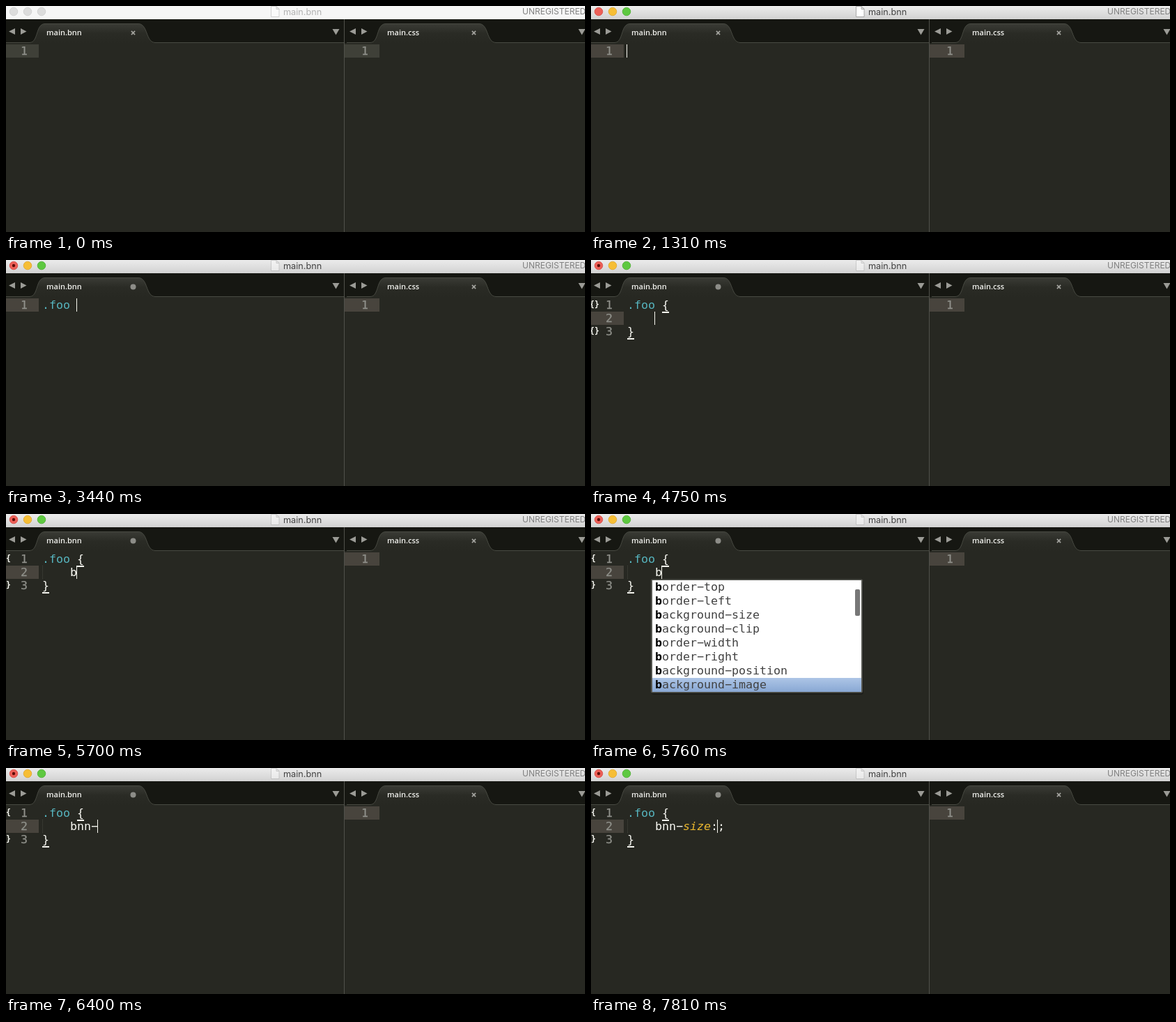
These frames come from a looping animation (831x324 px, 8000 ms). An HTML page:

```html
<!DOCTYPE html>
<html lang="en">
<head>
<meta charset="utf-8">
<title>Editor typing</title>
<style>
  html, body { margin: 0; width: 100%; height: 100%; overflow: hidden; background: #272822; }
  svg { display: block; width: 831px; height: 324px; }
  .code text { font: 16.61px "DejaVu Sans Mono", monospace; white-space: pre; fill: #f8f8f2; stroke-width: .25px; }
  .code .num { fill: #90918b; stroke: #90918b; }
  .code .sel { fill: #56b4be; }
  .code .prop { fill: #e9b62f; font-style: italic; }
  .code .mark { font-size: 11.5px; font-weight: bold; }
  .code .item { fill: #424242; }
  .code .hit { fill: #000; font-weight: bold; }
  .tab { font: 600 11px "Open Sans", "Noto Sans", sans-serif; fill: #f2f2ee; }
  .title { font: 12.7px Inter, sans-serif; fill: #b3b3b3; }
  .note { font: 12px Inter, sans-serif; fill: #808080; }
  .bar { fill: #f6f6f6; }
  .light { fill: #dcdcdc; stroke: #cecece; stroke-width: .8; }
  .row { fill: #3f4038; }
  .icon { opacity: .5; }
  .dot { visibility: hidden; }
  .focus .title { fill: #444; }
  .focus .bar { fill: url(#bar); }
  .focus .row { fill: #48443d; }
  .focus .icon { opacity: 1; }
  .focus .red { fill: #ec5f57; stroke: #d64a43; }
  .focus .amber { fill: #f6be35; stroke: #dea52b; }
  .focus .green { fill: #5ec840; stroke: #4bae30; }
  .dirty .icon { opacity: .45; }
  .dirty .dot { visibility: visible; }
  .dirty .clean { visibility: hidden; }
</style>
</head>
<body>
<svg id="stage" viewBox="0 0 831 324">
  <defs>
    <linearGradient id="bar" x2="0" y2="1">
      <stop stop-color="#ebebeb"/><stop offset="1" stop-color="#d2d2d2"/>
    </linearGradient>
    <linearGradient id="tab" x2="0" y2="1">
      <stop stop-color="#3a3b35"/><stop offset=".5" stop-color="#2a2b25"/><stop offset="1" stop-color="#272822"/>
    </linearGradient>
    <linearGradient id="pick" x2="0" y2="1">
      <stop stop-color="#adc5e6"/><stop offset="1" stop-color="#89a8d4"/>
    </linearGradient>
    <g id="pane">
      <path d="M13 32v9l-9-4.500z M21 32v9l8.500-4.500z" fill="#9b9b96"/>
      <path d="M34 53C47 52 42 25.500 56 25.500H190C204 25.500 200 52 214 53z" fill="url(#tab)"/>
      <path d="M0 52.500H34C47 52 42 25.500 56 25.500H190C204 25.500 200 52 214 52.500H485" fill="none" stroke="#484a42"/>
    </g>
    <path id="cross" d="M-2.600 -2.600L2.600 2.600M2.600 -2.600L-2.600 2.600" stroke="#a3a39e" stroke-width="1.700"/>
    <path id="drop" d="M-5 -4H5L0 4.500z" fill="#9b9b96"/>
  </defs>

  <rect width="831" height="324" fill="#272822"/>
  <rect class="bar" width="831" height="19"/>
  <circle class="light red" cx="11" cy="8" r="5.800"/>
  <circle class="light amber" cx="31" cy="8" r="5.800"/>
  <circle class="light green" cx="51" cy="8" r="5.800"/>
  <circle class="dot" cx="11" cy="8" r="2.200" fill="#5c0d09"/>
  <g class="icon" stroke="#999" stroke-width=".8" fill="#fff">
    <path d="M380.500 .5h7.500l4 4v11h-11.500z"/><path d="M388 .5v4h4z" fill="#e8e8e8"/>
  </g>
  <text class="title" x="398" y="13">main.bnn</text>
  <text class="note" x="741" y="12">UNREGISTERED</text>

  <rect y="19" width="831" height="34" fill="#161712"/>
  <use href="#pane"/>
  <use href="#pane" x="489"/>
  <use href="#drop" x="473.500" y="37"/>
  <use href="#drop" x="826.500" y="37"/>
  <text class="tab" x="58" y="42">main.bnn</text>
  <text class="tab" x="547" y="42">main.css</text>
  <use class="clean" href="#cross" x="182.500" y="38.500"/>
  <use href="#cross" x="671.500" y="38.500"/>
  <circle class="dot" cx="182.500" cy="38.500" r="4" fill="#8d8d88"/>
  <rect x="485" y="19" width="1" height="305" fill="#50514b"/>

  <g class="code">
    <rect class="row" x="486" y="55" width="50" height="19"/>
    <text class="num" x="510" y="70">1</text>
    <g id="live"></g>
  </g>
  <rect id="caret" width="1" height="19" fill="#f8f8f0"/>
</svg>
<script>
const LOOP = 8000, CHAR = 10, ROW = 19;
const stage = document.getElementById("stage");
const live = document.getElementById("live");
const caret = document.getElementById("caret");

// time, text of the edited line, caret column
const keys = [
  [0, "", -1], [1310, "", 0],
  [2010, ".", 1], [2390, ".f", 2], [2830, ".fo", 3], [3030, ".foo", 4],
  [3410, ".foo ", 5], [3830, ".foo {}", 6],
  [4750, "    ", 4], [5700, "    b", 5], [5960, "    bn", 6], [6200, "    bnn", 7],
  [6400, "    bnn-", 8], [6730, "    bnn-s", 9], [6880, "    bnn-si", 10],
  [7020, "    bnn-siz", 11], [7380, "    bnn-size", 12], [7750, "    bnn-size:;", 13]
];
const fades = [[1660, 1830], [4320, 4490], [5100, 5260]];

// time, typed letters, selected row, scroll thumb top, entries
const popups = [
  [5730, "b", 7, 108, "border-top border-left background-size background-clip border-width border-right background-position background-image"],
  [6020, "bn", 0, 97, "background-size background-clip background-position background-image background-color background-origin background-repeat background"],
  [6200, "bnn", 0, 0, "background-position background-origin"],
  [6400, "", 0, 0, ""]
];

const last = (list, t) => list.filter(e => e[0] <= t).pop();
const baseline = row => 70 + row * ROW;
const wide = s => s.replace(/-/g, "\u2212");
const text = (x, y, s, cls = "") => `<text class="${cls}" x="${x}" y="${y}">${wide(s)}</text>`;
const rect = (x, y, w, h, fill, more = "") =>
  `<rect x="${x}" y="${y}" width="${w}" height="${h}" fill="${fill}" ${more}/>`;
const put = (col, row, s, cls) => text(52 + col * CHAR, baseline(row), s, cls);
const underline = (col, row) => rect(52 + col * CHAR, 74 + row * ROW, 10, 2, "#f4f4ee");

function gutter(t, split) {
  const rows = split ? [0, 1, 2] : [0];
  let out = `<rect class="row" y="${split ? 74 : 55}" width="47" height="19"/>`;
  out += rows.map(r => text(21, baseline(r), String(r + 1), "num")).join("");
  if (t < 4080) return out;
  const single = t >= 5040;
  const x = single ? 0 : -2;
  out += text(x, 68, single ? "{" : "{}", "mark");
  if (split) out += text(x, 106, single ? "}" : "{}", "mark");
  return out;
}

function entry(word, typed, y) {
  let i = 0;
  const spans = [...word].map(c => {
    if (c !== typed[i]) return wide(c);
    i++;
    return `<tspan class="hit">${c}</tspan>`;
  });
  return `<text class="item" x="92" y="${y}">${spans.join("")}</text>`;
}

function popup([, typed, picked, thumb, words]) {
  if (!words) return "";
  const list = words.split(" "), h = list.length * 20;
  return rect(87, 96, 304, h + 3, "#000", 'opacity=".25" rx="3"')
    + rect(86, 93.5, 304, h + 3, "#555650", 'rx="2"')
    + rect(88, 95, 300, h, "#fff")
    + rect(88, 95 + picked * 20, 300, 20, "url(#pick)")
    + list.map((w, i) => entry(w, typed, 110 + i * 20)).join("")
    + (thumb ? rect(379, thumb, 7, 38, "#777", 'rx="2"') : "");
}

function scene(t, line) {
  const split = t >= 4750;
  let out = gutter(t, split);
  if (!split) {
    out += put(0, 0, line.slice(0, 4), t < 2390 ? "" : "sel") + put(5, 0, line.slice(5));
    if (t >= 4080) out += underline(5, 0) + underline(6, 0);
    return out;
  }
  out += put(0, 0, ".foo", "sel") + put(5, 0, "{") + put(0, 2, "}") + underline(5, 0) + underline(0, 2);
  if (t >= 5700) out += '<path d="M52.500 74v19" stroke="#46473f" stroke-dasharray="1 1"/>';
  const typed = line.slice(4);
  out += put(4, 1, typed.slice(0, 4));
  out += put(8, 1, typed.slice(4, 8), t >= 7380 ? "prop" : "");
  out += put(12, 1, typed.slice(8, 9)) + put(13, 1, typed.slice(9));
  const open = last(popups, t);
  return open ? out + popup(open) : out;
}

function caretAlpha(t, since) {
  const fade = fades.find(([a]) => a >= since && a <= t);
  if (!fade) return 1;
  const step = Math.floor((t - fade[0]) / (fade[1] - fade[0]) * 3) + 1;
  return 1 - Math.min(step, 4) / 4;
}

let shown = "";
function draw(now) {
  const t = now % LOOP;
  const [since, line, col] = last(keys, t);
  stage.setAttribute("class", (t >= 1310 ? "focus " : "") + (t >= 2010 ? "dirty" : ""));
  const next = scene(t, line);
  if (next !== shown) live.innerHTML = shown = next;
  caret.setAttribute("x", 51 + col * CHAR);
  caret.setAttribute("y", t >= 4750 ? 74 : 55);
  caret.setAttribute("opacity", col < 0 ? 0 : caretAlpha(t, since));
  requestAnimationFrame(draw);
}
draw(performance.now());
</script>
</body>
</html>
```
